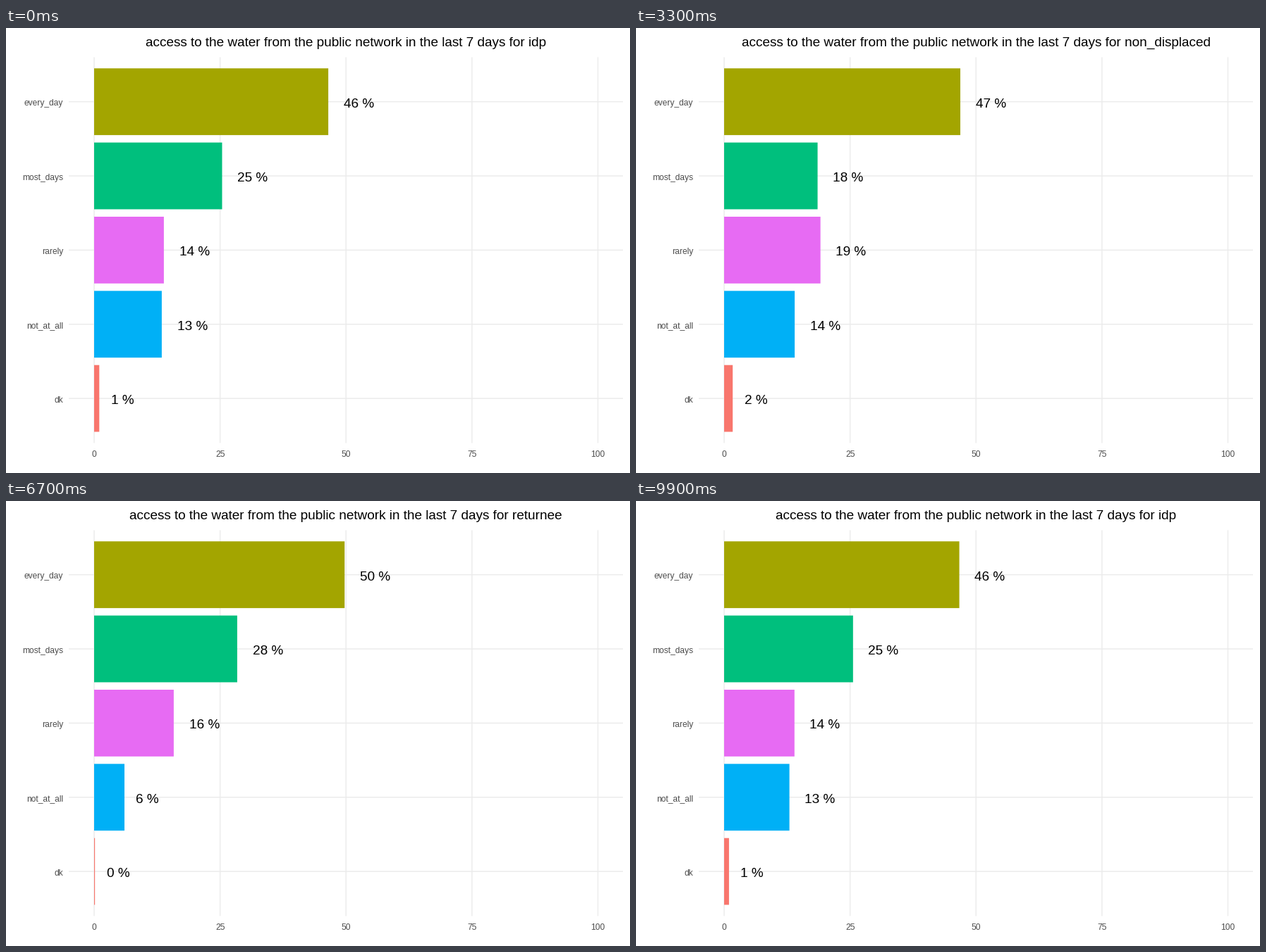
A matplotlib script that plays this animation: 885 by 632 pixels, repeating every 10000 ms.

```python
import numpy as np
import matplotlib.pyplot as plt
from matplotlib.animation import FuncAnimation
from matplotlib.patches import Rectangle

W, H, DPI = 885, 632, 100
FRAMES, INTERVAL = 100, 100
plt.rcParams["font.family"] = ["Liberation Sans", "DejaVu Sans"]

X0, UNIT = 125, 7.145             # pixel of 0 %, pixels per percent
ROW0, PITCH, BAR_H = 104.7, 105.35, 94.8
LEFT, RIGHT, TOP, BOTTOM = 89, 875, 41.5, 589.4
LABEL_PX, TICK_PX, TITLE_PX = 19, 12, 18.98

ROWS = ["every_day", "most_days", "rarely", "not_at_all", "dk"]
COLORS = ["#A3A500", "#00BF7D", "#E76BF3", "#00B0F6", "#F8766D"]
GROUPS = ["idp", "non_displaced", "returnee"]
VALUES = np.array([
    [46.48, 25.40, 13.84, 13.42, 1.02],
    [46.88, 18.55, 19.12, 14.00, 1.70],
    [49.72, 28.40, 15.80, 6.02, 0.16],
])
LABELS = [[46, 25, 14, 13, 1], [47, 18, 19, 14, 2], [50, 28, 16, 6, 0]]
TITLE = "access to the water from the public network in the last 7 days for "

# Each state holds, then moves linearly to the next one.
KEYS = [0, 16, 33, 50, 67, 84, 100]
STAGES = [0, 0, 1, 1, 2, 2, 3]

fig = plt.figure(figsize=(W / DPI, H / DPI), dpi=DPI, facecolor="white")
ax = fig.add_axes([0, 0, 1, 1])
ax.set_xlim(0, W)
ax.set_ylim(H, 0)
ax.axis("off")


def pt(px):
    return px * 72 / DPI


def write(x, y, text, px, color="black", ha="left"):
    return ax.text(x, y, text, fontsize=pt(px), color=color, ha=ha,
                   va="baseline", zorder=3)


def grid(xs, ys):
    ax.plot(xs, ys, color="#EBEBEB", lw=pt(1.4), snap=False,
            solid_capstyle="butt", zorder=1)


centers = ROW0 + PITCH * np.arange(len(ROWS))

for tick in range(0, 101, 25):
    x = X0 + tick * UNIT
    grid([x, x], [TOP, BOTTOM])
    write(x, 609, str(tick), TICK_PX, "#4D4D4D", "center")

bars, labels = [], []
for name, color, y in zip(ROWS, COLORS, centers):
    grid([LEFT, RIGHT], [y, y])
    write(81, y + 5.5, name, TICK_PX, "#4D4D4D", "right")
    bar = Rectangle((X0, y - BAR_H / 2), 0, BAR_H, fc=color, lw=0,
                    snap=False, zorder=2)
    bars.append(ax.add_patch(bar))
    labels.append(write(X0, y + 8, "", LABEL_PX))

title = write((LEFT + RIGHT) / 2, 26, "", TITLE_PX, ha="center")


def half_width(number):
    """Half the advance width of 'number %' in this typeface."""
    return LABEL_PX * (0.556 * len(str(number)) + 1.167) / 2


def update(frame):
    stage = np.interp(frame, KEYS, STAGES)
    a = int(stage)
    mix = stage - a
    a %= 3
    b = (a + 1) % 3
    values = VALUES[a] * (1 - mix) + VALUES[b] * mix
    shown = a if mix < 0.5 - 1e-9 else b
    title.set_text(TITLE + GROUPS[shown])
    for bar, label, value, number in zip(bars, labels, values, LABELS[shown]):
        bar.set_width(value * UNIT)
        label.set_x(X0 + value * UNIT + half_width(number))
        label.set_text(f"{number} %")
    return [title, *bars, *labels]


anim = FuncAnimation(fig, update, frames=FRAMES, interval=INTERVAL,
                     repeat=True, repeat_delay=0, blit=False)
plt.show()
```
